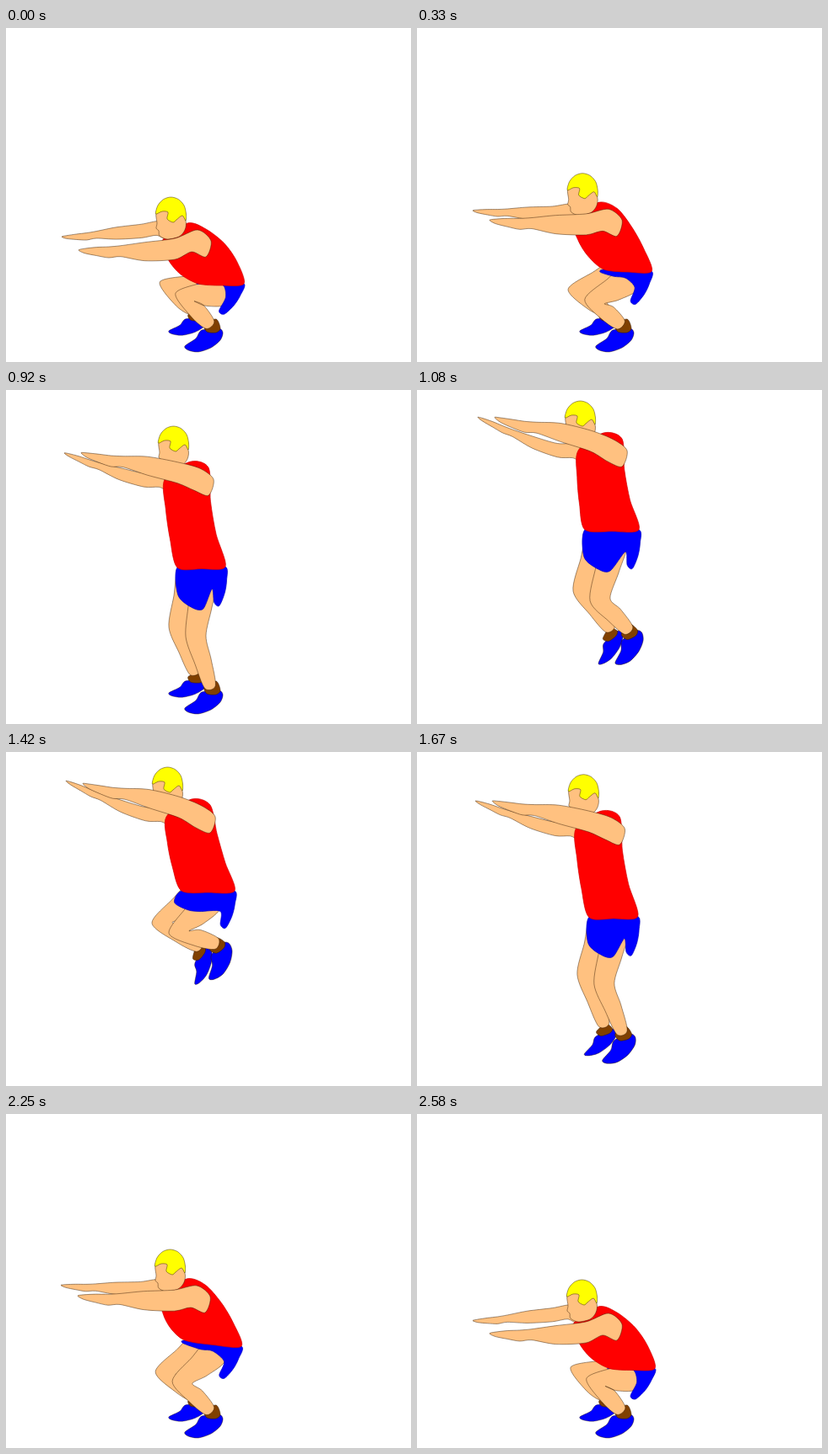
Recreate the animation shown at these times as an HTML page with a canvas. Size 480 by 397 pixels, loop 2660 ms.

```html
<!DOCTYPE html>
<html lang="en">
<head>
<meta charset="utf-8">
<title>Squat jump</title>
<style>
html, body { margin: 0; width: 100%; height: 100%; overflow: hidden; background: #fff; }
canvas { display: block; }
</style>
</head>
<body>
<canvas id="stage" width="480" height="397"></canvas>
<script>
const ctx = document.getElementById('stage').getContext('2d');
const LOOP = 2660, STEPS = 32, GROUND = 355, FOOT = [244, 358];
const SKIN = '#ffc180', RED = '#ff0000', BLUE = '#0000ff', BROWN = '#804000', YELLOW = '#ffff00';

const add = (p, dx, dy) => [p[0] + dx, p[1] + dy];
const mix = (p, q, t) => [p[0] + (q[0] - p[0]) * t, p[1] + (q[1] - p[1]) * t];
const turn = ([x, y], a) => [x * Math.cos(a) - y * Math.sin(a), x * Math.sin(a) + y * Math.cos(a)];

// Unit normal of the line from p to q, to the right when heading down
function normal(p, q) {
  const dx = q[0] - p[0], dy = q[1] - p[1], len = Math.hypot(dx, dy) || 1;
  return [dy / len, -dx / len];
}
function bow(p, q, bulge) {
  const [nx, ny] = normal(p, q);
  return [1 / 3, 2 / 3].map(t => add(mix(p, q, t), nx * bulge, ny * bulge));
}

// The joints that drive the figure; reach is the slope of the arms
const pose = (head, shoulder, waistFront, waistBack, knee, reach, foot = FOOT) =>
  ({ head, shoulder, waistFront, waistBack, knee, reach: [reach], foot });

const crouch = pose([196, 225], [229, 255], [228, 304], [282, 304], [212, 320], .063);
const rise = pose([198, 131], [229, 170], [210, 248], [269, 251], [209, 318], -.147);
const airborne = pose([194, 37], [235, 74], [199, 166], [263, 166], [217, 249], -.29, [253, 291]);
const tucked = pose([192, 42], [234, 79], [208, 165], [271, 165], [205, 214], -.29, [252, 233]);
const landed = pose([199, 83], [232, 122], [203, 219], [260, 218], [225, 296], -.235);
const sinking = pose([195, 185], [228, 219], [212, 269], [279, 276], [209, 319], -.02);

// Raises a standing pose by `lift` at the head, fading to none at the ground
function stretch(base, lift) {
  const rate = lift / (GROUND - base.head[1]);
  const raise = (v, i) => i && v < GROUND ? v - rate * (GROUND - v) : v;
  return Object.fromEntries(Object.entries(base).map(([joint, p]) => [joint, p.map(raise)]));
}

const keys = [
  [0, crouch], [8, rise], [11, stretch(landed, 16)], [13, airborne], [17, tucked],
  [21, stretch(landed, 20)], [22, landed], [27, sinking], [31, stretch(crouch, 4)]
];

function keyAt(i) {
  const n = keys.length, lap = Math.floor(i / n), [step, joints] = keys[i - lap * n];
  return { step: step + lap * STEPS, joints };
}

// Slope at the middle of three keys; flat at turning points
const slope = (h0, d0, h1, d1) => d0 * d1 <= 0 ? 0 : (h0 * d1 + h1 * d0) / (h0 + h1);

function poseAt(step) {
  let i = keys.length - 1;
  while (keys[i][0] > step) i--;
  const [a, b, c, d] = [-1, 0, 1, 2].map(o => keyAt(i + o));
  const h0 = b.step - a.step, h1 = c.step - b.step, h2 = d.step - c.step;
  const s = (step - b.step) / h1, ease = s * s * (3 - 2 * s);
  const blend = (p, q, r, t) => {
    const d0 = (q - p) / h0, d1 = (r - q) / h1, d2 = (t - r) / h2;
    return q + (r - q) * ease + h1 * s * (1 - s) *
      ((1 - s) * slope(h0, d0, h1, d1) - s * slope(h1, d1, h2, d2));
  };
  return Object.fromEntries(Object.entries(b.joints).map(([joint, p]) =>
    [joint, p.map((v, j) => blend(a.joints[joint][j], v, c.joints[joint][j], d.joints[joint][j]))]));
}

// Closed smooth curve through a few points
function shape(pts, fill, line = 'rgba(50,25,0,.65)') {
  const n = pts.length, k = 1 / 7, at = i => pts[(i + n) % n];
  ctx.beginPath();
  ctx.moveTo(...pts[0]);
  for (let i = 0; i < n; i++) {
    const [p, q, r, t] = [i - 1, i, i + 1, i + 2].map(at);
    ctx.bezierCurveTo(q[0] + (r[0] - p[0]) * k, q[1] + (r[1] - p[1]) * k,
      r[0] - (t[0] - q[0]) * k, r[1] - (t[1] - q[1]) * k, r[0], r[1]);
  }
  ctx.fillStyle = fill;
  ctx.fill();
  ctx.strokeStyle = line;
  ctx.stroke();
}

function leg(hip, knee, ankle) {
  const line = [hip, mix(hip, knee, .5), knee, mix(knee, ankle, .5), ankle];
  const radii = [15, 14, 12, 10, 6.5];
  const side = sign => line.map((p, i) => {
    const [nx, ny] = normal(line[Math.max(i - 1, 0)], line[Math.min(i + 1, 4)]);
    return add(p, sign * radii[i] * nx, sign * radii[i] * ny);
  });
  shape([...side(1), ...side(-1).reverse()], SKIN);
}

// Thickness above and below the arm's centre line, from fingers to upper arm
const armProfile = [[.95, 1.5, 4], [.85, 3, 7], [.75, 4, 9], [.65, 6, 7], [.45, 11, 11], [.2, 13, 12]];
const shoulderCap = [[-2, -15], [14, -2], [8, 17], [-9, 11]];

function arm(shoulder, length, rise, size, sag) {
  const hand = add(shoulder, -length, length * rise);
  const edge = (u, offset) => add(mix(shoulder, hand, u), 0, sag * 6.75 * u * (1 - u) ** 2 + offset * size);
  shape([
    hand,
    ...armProfile.map(([u, top]) => edge(u, -top)),
    ...shoulderCap.map(([x, y]) => add(shoulder, x * size, y * size)),
    ...armProfile.map(([u, , bottom]) => edge(u, bottom)).reverse()
  ], SKIN);
}

const shoe = [[-32, 20], [-28, 25], [-16, 27], [-1, 22], [10, 13], [13, 4], [8, -1], [-12, 1], [-19, 11]];
const sock = [[-9, -6], [5, -12], [10, -1], [5, 4], [-6, 3]];

function foot([x, y], angle, height) {
  ctx.save();
  ctx.translate(x, y);
  ctx.rotate(angle);
  ctx.scale(1, height);
  shape(shoe, BLUE);
  shape(sock, BROWN);
  ctx.restore();
}

const dome = Array.from({ length: 7 }, (_, i) => {
  const a = Math.PI * (1 + i / 6);
  return [18 * Math.cos(a) - .5, 20 * Math.sin(a) - 4];
});
const fringe = [[17, 4], [13, -2], [6, 3], [2, 6], [-5, 2], [-4, -6], [-11, -7]];
const face = [[-18, -5], [-17, 7], [-18, 13], [-15, 16], [-14, 22], [-5, 26], [9, 23], [16, 15], [17, 4], [8, -14], [-10, -14]];

function head([x, y]) {
  ctx.save();
  ctx.translate(x, y);
  shape(face, SKIN);
  shape([...dome, ...fringe], YELLOW);
  ctx.restore();
}

function draw(step) {
  const { head: skull, shoulder, waistFront, waistBack, knee, reach: [reach], foot: near } = poseAt(step);
  const back = add(shoulder, 8, -16);
  const lean = (waistBack[0] - back[0]) / (waistBack[1] - back[1]);
  const waist = mix(waistFront, waistBack, .5);

  // Toes drop as the feet leave the ground
  const angle = -Math.sqrt(Math.max(0, FOOT[1] - near[1])) / 16, farAngle = angle * 1.35;
  const far = add(near, ...turn([-19, -13], farAngle));
  const farKnee = add(knee, -20, -11);

  // Shorts ride up the thighs as the body leans
  const cover = .62 - .9 * lean;
  const hem = mix(waist, knee, 1.1 * cover + .08);
  const tail = add(waistBack, -2 - 31 * lean, 50 - 20 * lean);

  ctx.fillStyle = '#fff';
  ctx.fillRect(0, 0, 480, 397);
  ctx.lineWidth = 0.7;
  ctx.lineJoin = 'round';

  arm(add(shoulder, -45, 5 - 30 * lean), 118, reach * 1.2, .65, 2 - 20 * reach);
  foot(far, farAngle, .75);
  leg(add(mix(waistFront, waistBack, .3), 0, 4), farKnee, add(far, -1, -9));
  foot(near, angle, 1);
  leg(add(waist, 4, 9), knee, add(near, -2, -5));
  shape([
    waistFront, waist, waistBack, ...bow(waistBack, tail, 4), tail, add(tail, -6, -4),
    add(tail, 20 * lean - 12, -20), add(hem, 6, 1), add(hem, -8, -1), mix(waistFront, farKnee, cover)
  ], BLUE, '#0000c0');
  const chest = add(shoulder, -44, -2);
  shape([
    add(shoulder, -14, -23), back, ...bow(back, waistBack, 24 * (lean - .35)), waistBack,
    add(waist, 0, 2), waistFront, ...bow(waistFront, chest, 2 + 10 * lean), chest
  ], RED, '#d00000');
  head(skull);
  arm(shoulder, 143, reach, 1, 5 + 35 * reach);
}

// Twelve steps a second, held on a 10 ms grid
function tick() {
  const t = performance.now() % LOOP;
  draw(Math.floor((Math.floor(t / 10) * 10 + 5) * 12 / 1000));
  requestAnimationFrame(tick);
}
tick();
</script>
</body>
</html>
```
